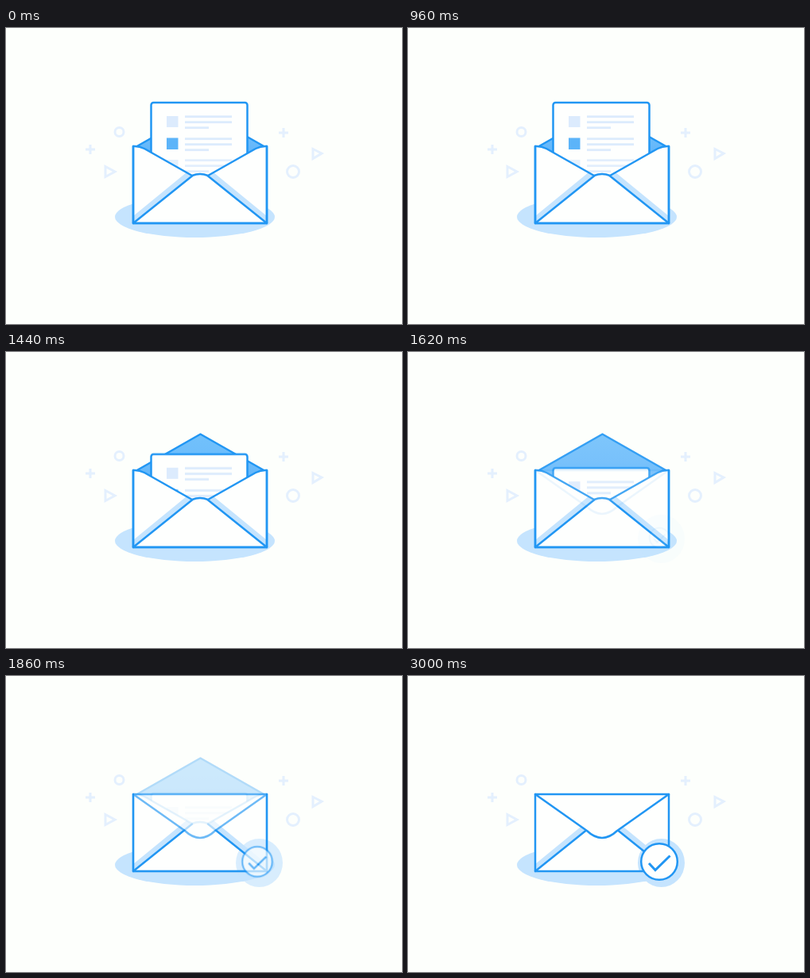
An HTML page that plays this animation: 498x373 px, repeating every 3.06 s.

```html
<!DOCTYPE html>
<html lang="en">
<head>
<meta charset="utf-8">
<title>Envelope</title>
<style>
  html, body { margin: 0; width: 100%; height: 100%; overflow: hidden; background: #fdfffc; }
  svg { display: block; width: 100vw; height: 100vh; }

  .line { fill: none; stroke: #2196f3; stroke-width: 2.5; stroke-linejoin: round; stroke-linecap: round; }
  .paper { fill: #fefffe; }
  .shade { fill: #c5e4fe; }
  .decor { fill: none; stroke: #e4f0fe; stroke-width: 3; }
  .pale { fill: #dcebfd; }
  .strong { fill: #5cb4f9; }

  .letter, .open, .closed, .badge { animation: 3060ms linear infinite both; }
  .letter { animation-name: slide; }
  .open { animation-name: leave; }
  .closed { animation-name: appear; }
  .badge { animation-name: grow; transform-origin: 316px 234px; }

  /* letter slides 1080-1640 ms, states cross-fade 1586-2007 ms */
  @keyframes slide {
    0%, 35.294% { transform: translateY(0); }
    53.595%, 100% { transform: translateY(54px); }
  }
  @keyframes leave {
    0%, 51.83% { opacity: 1; }
    65.59%, 100% { opacity: 0; }
  }
  @keyframes appear {
    0%, 51.83% { opacity: 0; }
    65.59%, 100% { opacity: 1; }
  }
  @keyframes grow {
    0%, 51.83% { opacity: 0; transform: scale(.5); }
    65.59%, 100% { opacity: 1; transform: scale(1); }
  }
</style>
</head>
<body>
<svg viewBox="0 0 498 373">
  <defs>
    <linearGradient id="inside" x1="0" y1="0" x2="0" y2="1">
      <stop offset="0" stop-color="#72c1fb"/>
      <stop offset=".4" stop-color="#6cbcfb"/>
      <stop offset="1" stop-color="#4ea9f7"/>
    </linearGradient>
    <path id="front" d="M160 149Q167 148.500 174 152L234 186Q244 182 254 186L314 152Q321 148.500 328 149V246H160Z"/>
    <clipPath id="frontClip"><use href="#front"/></clipPath>
    <g id="item">
      <rect x="225" y="0" width="59" height="2.800"/>
      <rect x="225" y="7" width="59" height="2.800"/>
      <rect x="225" y="14" width="30" height="2.800"/>
    </g>
  </defs>

  <g class="decor">
    <path d="M106 147v12M100 153h12M349 126v12M343 132h12"/>
    <circle cx="142.500" cy="131" r="5.500"/>
    <circle cx="361" cy="181" r="7.500"/>
    <path d="M125 174.500L137 181L125 187.500ZM386 152.500L397 158L386 164.500Z"/>
  </g>

  <ellipse class="shade" cx="237.500" cy="238" rx="100.500" ry="26"/>
  <rect class="paper" x="160" y="149" width="168" height="97"/>

  <g class="open">
    <path d="M163 150L244.500 103.500L326 150L244 192Z" fill="url(#inside)"/>
    <path class="line" d="M163 150L244.500 103.500L326 150"/>
    <g class="letter">
      <rect class="line" x="182.500" y="94" width="121" height="97" rx="3" style="fill:#fefffe"/>
      <g class="pale">
        <rect x="202" y="111" width="14.500" height="14"/>
        <rect class="strong" x="202" y="138.500" width="14.500" height="14.500"/>
        <rect x="202" y="166" width="14.500" height="14" opacity=".7"/>
        <use href="#item" y="110.300"/>
        <use href="#item" y="138.300"/>
        <use href="#item" y="165.300" opacity=".8"/>
      </g>
    </g>
  </g>

  <use href="#front" class="paper"/>
  <ellipse class="shade closed" cx="318.500" cy="235.500" rx="29.500" ry="30.500"/>
  <g clip-path="url(#frontClip)">
    <path class="shade" d="M160 246V237L227 182L234 187ZM328 246V237L261 182L254 187Z"/>
  </g>
  <path class="line" d="M160 246L234 186.500M254 186.500L328 246"/>
  <use href="#front" class="line open"/>

  <g class="closed">
    <path class="line" style="fill:#fefffe" d="M160 149L225 195Q244 213 263 195L328 149Z"/>
  </g>
  <path class="line" d="M160 149V246H328V149"/>

  <g class="badge">
    <circle class="line" cx="316" cy="234" r="22.800" style="fill:#fefffe"/>
    <path class="line" style="stroke-width:3;stroke-linecap:butt;stroke-linejoin:miter" d="M303 236L311 244.500L329.500 226.500"/>
  </g>
</svg>
</body>
</html>
```
